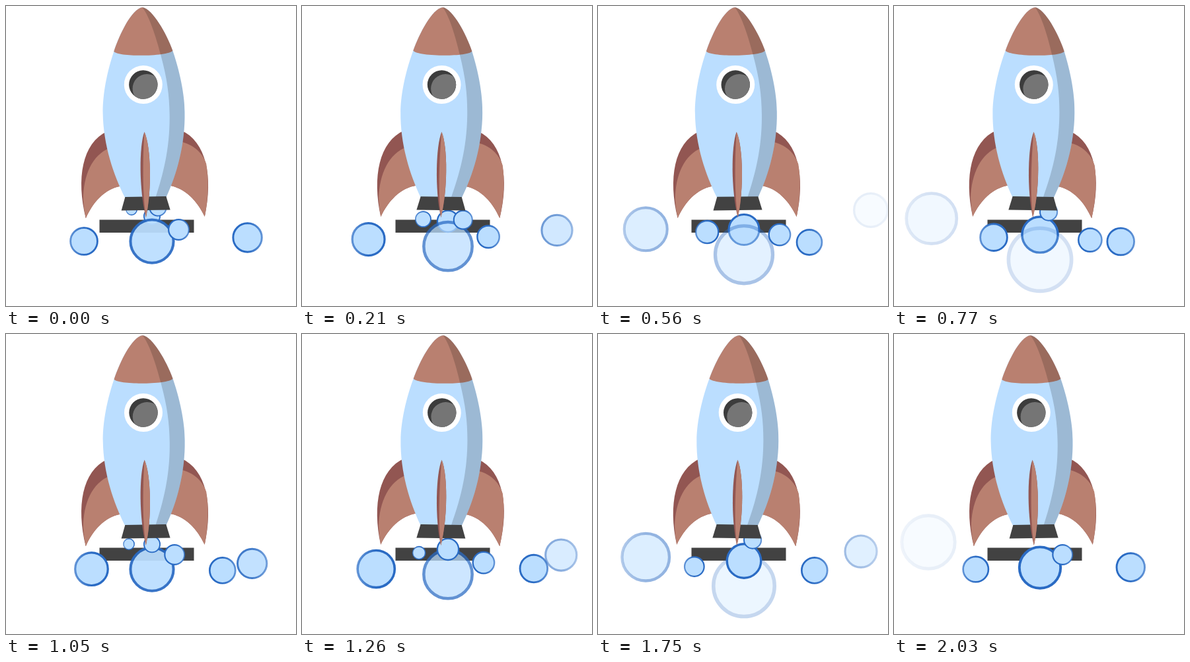
Write an HTML page that moves like this. It is 439 px wide and 454 px high and loops after 2.1 s.

```html
<!DOCTYPE html>
<html lang="en">
<head>
<meta charset="utf-8">
<title>Rocket launch</title>
<style>
  html, body { margin: 0; width: 100%; height: 100%; overflow: hidden; background: #fff; }
  svg { display: block; width: 439px; height: 454px; }
</style>
</head>
<body>
<svg viewBox="0 0 439 454">
  <defs>
    <linearGradient id="rimLeft">
      <stop offset="0" stop-color="#2a6bc4" stop-opacity=".7"/>
      <stop offset=".5" stop-color="#2a6bc4"/>
    </linearGradient>
    <linearGradient id="rimRight">
      <stop offset=".5" stop-color="#2a6bc4"/>
      <stop offset="1" stop-color="#2a6bc4" stop-opacity=".7"/>
    </linearGradient>
    <clipPath id="pane"><circle cx="209.8" cy="119" r="21.7"/></clipPath>
    <path id="hull" d="M210 2C194 4 175 42 166 68C152 108 148 140 148 161C148 210 163 255 180 290H242C259 255 272 210 272 161C272 140 268 108 255 68C246 42 225 4 210 2Z"/>
    <clipPath id="hullClip"><use href="#hull"/></clipPath>
  </defs>

  <rect x="141.5" y="323.5" width="143" height="19.5" fill="#424242"/>
  <g id="smoke"></g>

  <g id="rocket">
    <g fill="#925652">
      <path d="M154 189C116 206 106 260 120 320C131 296 149 276 174 272Z"/>
      <path d="M266 189C304 206 314 260 300 320C289 296 271 276 246 272Z"/>
    </g>
    <g fill="#b98070">
      <path d="M158 214C131 224 117 255 116.500 292Q117 306 120 320C131 296 149 276 174 272Z"/>
      <path d="M264 206C284 210 298 223 303.500 240C307 262 306 293 300 320C289 296 271 276 246 272Z"/>
    </g>
    <use href="#hull" fill="#bbdeff"/>
    <path d="M210 2C194 4 175 42 166 68C172 77 249 77 255 68C246 42 225 4 210 2Z" fill="#b98070"/>
    <path d="M210 2C222 18 232 55 237 75C246 110 249 135 249 165C249 215 238 255 226 290H290V2Z"
      fill="#000" fill-opacity=".17" clip-path="url(#hullClip)"/>
    <circle cx="209.800" cy="119" r="29" fill="#fff"/>
    <circle cx="209.800" cy="119" r="21.700" fill="#3c3c3c"/>
    <circle cx="215.500" cy="125" r="22" fill="#757575" clip-path="url(#pane)"/>
    <path d="M180 288.500H242L248 309H174Z" fill="#424242"/>
    <path d="M210.500 190.500C220 212 221 278 211 320C201 278 202 212 210.500 190.500Z" fill="#925652"/>
    <path d="M210.500 190.500C220 212 221 278 211 320C205.500 280 208 222 210.500 190.500Z" fill="#b98070"/>
  </g>
</svg>
<script>
  const STEP = 70, STEPS = 30, LIFE = STEPS - 1;
  const rocket = document.getElementById('rocket');
  const smoke = document.getElementById('smoke');
  const clamp = v => Math.max(0, Math.min(1, v));

  const bezier = (u, a, b, c, d) => {
    const v = 1 - u;
    return v * v * v * a + 3 * v * v * u * b + 3 * v * u * u * c + u * u * u * d;
  };

  // Each flow gives place, radius and opacity from a puff's age in steps.
  const down = {
    rim: '#2a6bc4',
    at: s => [221, 318.3 + 2.52 * s],
    size: s => 13 + 1.44 * s,
    alpha: s => (LIFE - s) / 15
  };
  const left = {
    rim: 'url(#rimLeft)',
    at: s => [bezier(s / LIFE, 190, 175, 97, 52), bezier(s / LIFE, 308, 358, 382, 315)],
    size: s => 9 + 1.16 * s,
    alpha: s => (STEPS - s) / 10
  };
  const lateLeft = { ...left, size: s => 8.3 + 0.25 * s + 0.032 * s * s };
  const right = {
    rim: 'url(#rimRight)',
    at: s => [bezier(s / LIFE, 230, 267, 381, 417), bezier(s / LIFE, 305, 371, 381, 301)],
    size: s => 13.6 + 0.48 * s,
    alpha: s => (LIFE - s) / 9
  };

  const puffs = [[down, 0], [down, 15], [left, 0], [lateLeft, 13],
                 [right, 24], [right, 0], [right, 10]].map(([flow, birth]) => {
    const el = document.createElementNS('http://www.w3.org/2000/svg', 'circle');
    el.setAttribute('fill', '#bbdeff');
    el.setAttribute('stroke', flow.rim);
    smoke.append(el);
    return { el, flow, birth };
  });

  function drawPuff({ el, flow, birth }, n) {
    const age = (n - birth + STEPS) % STEPS;
    const [x, y] = flow.at(age);
    const size = flow.size(age), rim = 0.6 + size * 0.1;
    el.setAttribute('cx', x);
    el.setAttribute('cy', y);
    el.setAttribute('r', size - rim / 2);
    el.setAttribute('stroke-width', rim);
    el.setAttribute('opacity', clamp(flow.alpha(age)));
  }

  const start = performance.now();
  function draw(now) {
    const n = Math.floor(Math.max(0, now - start) / STEP) % STEPS;
    const angle = -0.8 * Math.cos(8 * Math.PI * n / LIFE);
    rocket.setAttribute('transform', `rotate(${angle} 210.3 262)`);
    puffs.forEach(p => drawPuff(p, n));
    requestAnimationFrame(draw);
  }
  draw(start);
</script>
</body>
</html>
```
